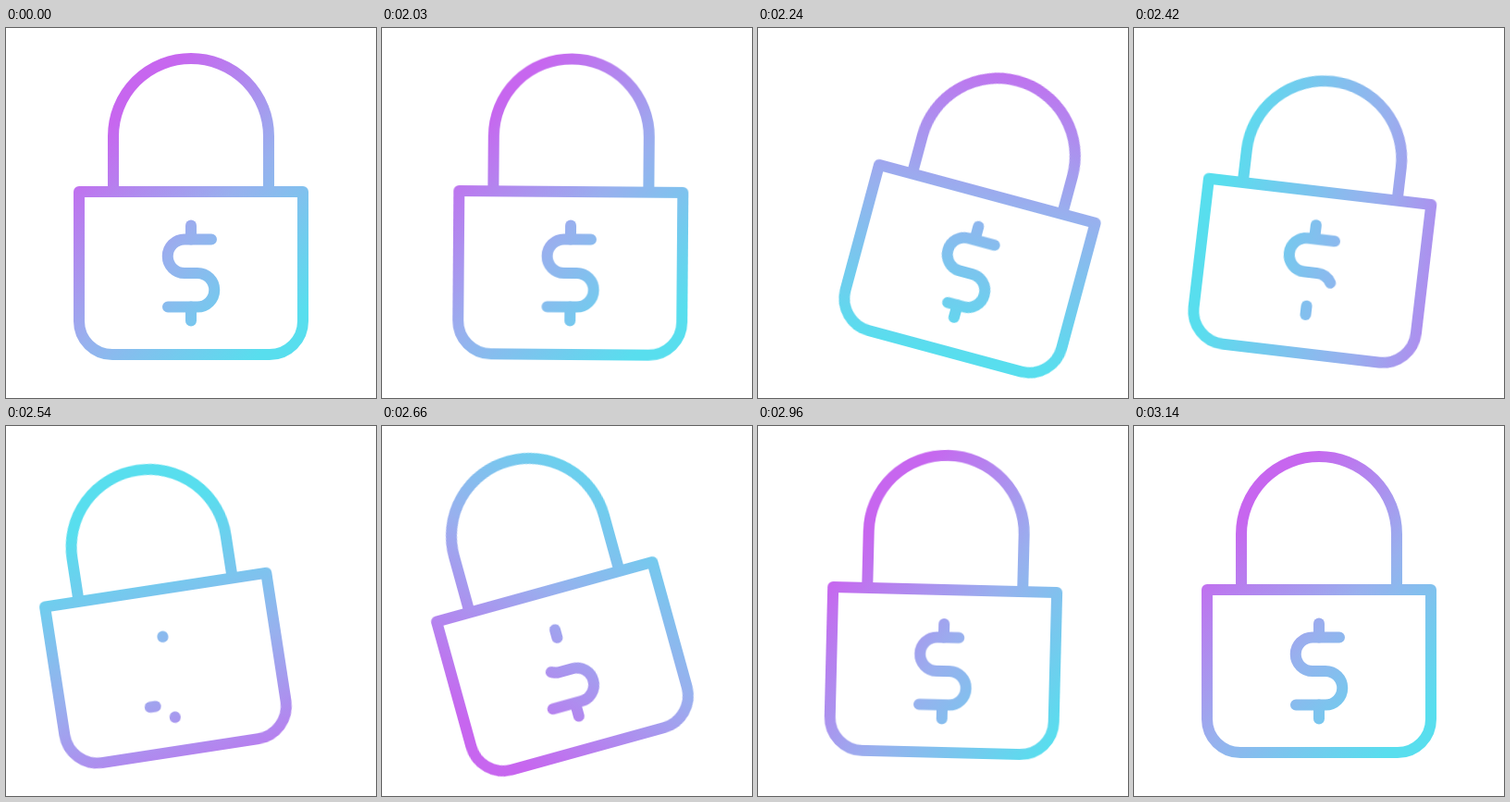
An HTML page without scripts for the animation above (3.17 s loop, 400 px wide and 400 px high).

```html
<!DOCTYPE html>
<html lang="en">
<head>
<meta charset="utf-8">
<title>Padlock</title>
<style>
  html, body { margin: 0; width: 100%; height: 100%; overflow: hidden; background: #fff; }
  svg { display: block; width: 100%; height: 100%; }

  path {
    fill: none;
    stroke: url(#tint);
    stroke-width: 12;
    stroke-linejoin: round;
  }
  .slide, .swing, .shackle, .sign path {
    animation: 3.17s cubic-bezier(.37, 0, .63, 1) infinite;
  }
  .slide { animation-name: slide; }
  .swing { animation-name: swing; transform-origin: 200px 265px; }
  .shackle { animation-name: shackle; }
  .sign path {
    animation-name: redraw;
    stroke-linecap: round;
    stroke-dasharray: 1 2;
  }

  @keyframes slide {
    0% { transform: translateX(0); }
    63.1% { transform: translateX(0); animation-timing-function: cubic-bezier(.33, .33, .67, 1); }
    70.5% { transform: translateX(25px); }
    80% { transform: translateX(-25px); }
    86.6% { transform: translateX(12px); }
    93.2%, 100% { transform: translateX(0); }
  }
  @keyframes swing {
    0%, 63.1% { transform: translateY(0) rotate(0deg); }
    72.1% { transform: translateY(-.7px) rotate(16deg); }
    83.75% { transform: translateY(-.9px) rotate(-15.5deg); }
    90.2% { transform: translateY(0) rotate(2.5deg); }
    97.2%, 100% { transform: translateY(0) rotate(0deg); }
  }
  /* The arch sinks and springs up while its feet stay on the body. */
  @keyframes shackle {
    0%, 63.1% { d: path("M116 174V117A84 84 0 0 1 284 117V174"); }
    75.1% { d: path("M116 174V142A84 84 0 0 1 284 142V174"); }
    88% { d: path("M116 174V106.5A84 84 0 0 1 284 106.5V174"); }
    95%, 100% { d: path("M116 174V117A84 84 0 0 1 284 117V174"); }
  }
  /* Erased from the end, then drawn back from the end. */
  @keyframes redraw {
    0% { stroke-dashoffset: 0; }
    63.1% { stroke-dashoffset: 0; animation-timing-function: cubic-bezier(.72, 0, .86, .4); }
    80% { stroke-dashoffset: 1; animation-timing-function: step-end; }
    80.01% { stroke-dashoffset: -1; animation-timing-function: cubic-bezier(.15, .6, .3, 1); }
    99.05%, 100% { stroke-dashoffset: 0; }
  }
</style>
</head>
<body>
<svg viewBox="0 0 400 400">
  <defs>
    <linearGradient id="tint" gradientUnits="userSpaceOnUse" x1="-175" y1="0" x2="115" y2="0"
                    gradientTransform="translate(200 265)">
      <stop offset="0" stop-color="#c766ef"/>
      <stop offset=".5" stop-color="#98b0ee"/>
      <stop offset="1" stop-color="#58deee"/>
      <animateTransform attributeName="gradientTransform" type="rotate" additive="sum"
        dur="3.17s" repeatCount="indefinite" calcMode="spline"
        values="45;45;405;405" keyTimes="0;.631;.9905;1"
        keySplines="0 0 1 1;.42 0 .38 1;0 0 1 1"/>
      <animate attributeName="x1" dur="3.17s" repeatCount="indefinite"
        values="-175;-175;-250;-225;-110;-140;-175;-175"
        keyTimes="0;.631;.707;.763;.839;.886;.9905;1"/>
      <animate attributeName="x2" dur="3.17s" repeatCount="indefinite"
        values="115;115;90;110;230;165;115;115"
        keyTimes="0;.631;.707;.763;.839;.886;.9905;1"/>
    </linearGradient>
  </defs>
  <g class="slide">
    <g class="swing">
      <path class="shackle" d="M116 174V117A84 84 0 0 1 284 117V174"/>
      <path d="M79 177H321V317A36 36 0 0 1 285 353H115A36 36 0 0 1 79 317Z"/>
      <g class="sign">
        <path pathLength="1" d="M200 213.5V228.5"/>
        <path pathLength="1" d="M222 228.5H193A18.25 18.25 0 0 0 193 265H207A18.25 18.25 0 0 1 207 301.5H175"/>
        <path pathLength="1" d="M200 301.5V316.5"/>
      </g>
    </g>
  </g>
</svg>
</body>
</html>
```
